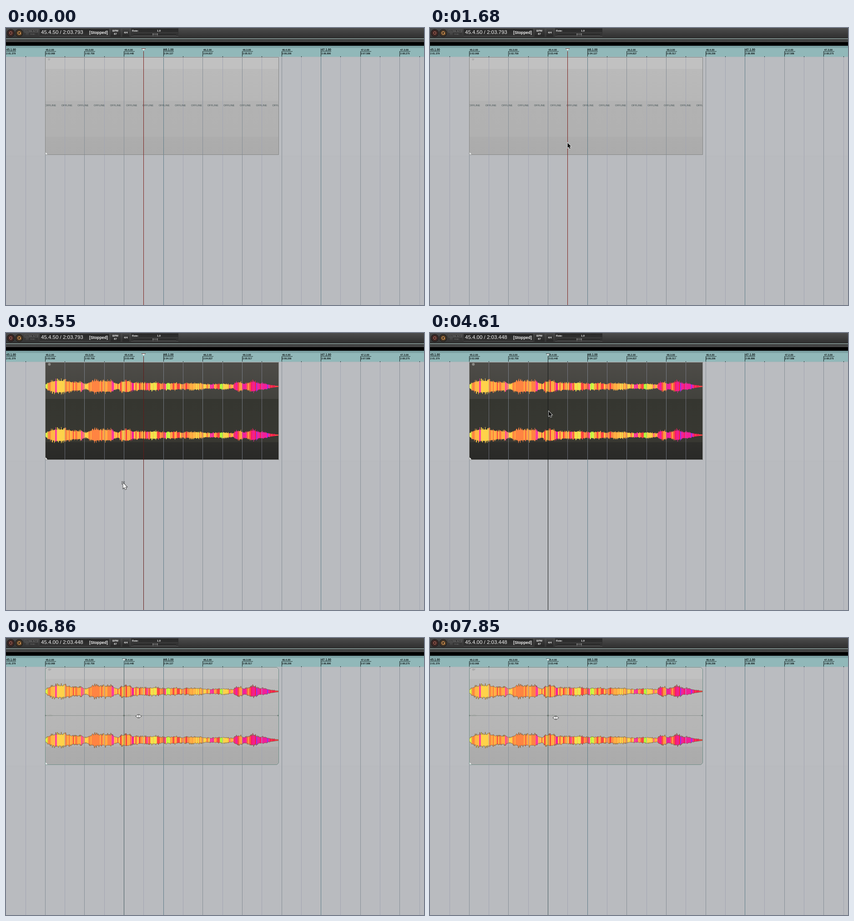
Write an HTML page with a canvas that moves like this. It is 919 px wide and 609 px high and loops after 8 s.

```html
<!DOCTYPE html>
<html lang="en">
<head>
<meta charset="utf-8">
<title>Timeline</title>
<style>
html, body { margin: 0; width: 100%; height: 100%; overflow: hidden; background: #b9bbbf; }
canvas { display: block; width: 919px; height: 609px; }
</style>
</head>
<body>
<canvas id="stage" width="919" height="609"></canvas>
<script>
const ctx = document.getElementById('stage').getContext('2d');
const LOOP = 8000, W = 919, H = 609;
const BEAT = 86.62, ORIGIN = -0.3;
const ITEM = { x: 86, y: 64, w: 514, h: 215 };
const SANS = '"Liberation Sans", Arial, sans-serif';

const beatX = i => ORIGIN + BEAT * i;
const gridX = i => Math.floor(beatX(i));

function rect(x, y, w, h, fill) {
  ctx.fillStyle = fill;
  ctx.fillRect(x, y, w, h);
}

function shade(x, y, w, h, ...colors) {
  const g = ctx.createLinearGradient(0, y, 0, y + h);
  colors.forEach((c, i) => g.addColorStop(i / (colors.length - 1), c));
  rect(x, y, w, h, g);
}

function text(s, x, y, size, fill, weight = '', align = 'left') {
  ctx.font = `${weight} ${size}px ${SANS}`;
  ctx.textAlign = align;
  ctx.fillStyle = fill;
  ctx.fillText(s, x, y);
}

function poly(points, fill, stroke, width = 1) {
  ctx.beginPath();
  points.forEach(([x, y]) => ctx.lineTo(x, y));
  ctx.closePath();
  if (stroke) {
    ctx.strokeStyle = stroke;
    ctx.lineWidth = width;
    ctx.stroke();
  }
  if (fill) {
    ctx.fillStyle = fill;
    ctx.fill();
  }
}

function disc(x, y, r, fill, stroke, width = 1) {
  ctx.beginPath();
  ctx.arc(x, y, r, 0, 7);
  if (fill) { ctx.fillStyle = fill; ctx.fill(); }
  if (stroke) { ctx.strokeStyle = stroke; ctx.lineWidth = width; ctx.stroke(); }
}

function randomizer(seed) {
  return () => {
    seed = (seed * 1664525 + 1013904223) >>> 0;
    return seed / 4294967296;
  };
}

// Waveform: loudness curve, plus colour bands by pitch
const LOUDNESS = [
  [86, 4], [91, 10], [98, 14], [108, 17], [120, 18], [134, 16], [148, 12], [165, 12],
  [175, 7], [185, 13], [196, 17], [212, 15], [230, 16], [240, 9], [247, 8], [254, 14],
  [268, 17], [278, 11], [300, 10], [328, 11], [345, 8], [370, 10], [386, 7], [405, 9],
  [420, 9], [440, 6], [455, 6], [478, 8], [498, 5], [505, 11], [514, 13], [522, 8],
  [532, 10], [542, 15], [556, 9], [566, 9], [577, 5], [588, 3], [600, 1]
];
const TONES = {
  y: '#ffd24a', o: '#ffad42', d: '#ff8442', r: '#fb4444', p: '#ff4b9b',
  m: '#f21f9a', g: '#b4f83a', l: '#e6ef4d', v: '#8a35f5', c: '#f8204f'
};
const BANDS = [
  [91, 'lg'], [108, 'oyd'], [112, 'rp'], [130, 'yyo'], [147, 'yod'], [154, 'rpo'],
  [172, 'odyp'], [180, 'ply'], [206, 'odd'], [214, 'rdo'], [232, 'ddo'], [238, 'mp'],
  [260, 'oydr'], [275, 'dror'], [281, 'mpo'], [306, 'oydr'], [317, 'drp'], [332, 'yly'],
  [346, 'dro'], [352, 'mpr'], [361, 'gl'], [376, 'dor'], [400, 'oyrd'], [420, 'oyyd'],
  [448, 'yold'], [457, 'cmp'], [470, 'odr'], [486, 'lyg'], [500, 'oyp'], [509, 'pmr'],
  [519, 'dor'], [529, 'mp'], [537, 'ord'], [550, 'ccm'], [558, 'vvm'], [571, 'mmc'],
  [580, 'mvr'], [600, 'cr']
];

function loudness(x) {
  const i = Math.max(1, LOUDNESS.findIndex(p => p[0] >= x));
  const [x0, a0] = LOUDNESS[i - 1], [x1, a1] = LOUDNESS[i];
  return a0 + (a1 - a0) * (x - x0) / (x1 - x0);
}

const wave = (() => {
  const rnd = randomizer(87), cols = [];
  let tone = TONES.l, left = 0, band = null;
  for (let x = 86; x < 600; x++) {
    const next = BANDS.find(b => x < b[0]);
    if (next !== band || left-- <= 0) {
      band = next;
      tone = TONES[band[1][Math.floor(rnd() * band[1].length)]];
      left = Math.floor(rnd() * 3);
    }
    // A steady body with sparse sharp peaks
    const a = loudness(x);
    const spike = () => a * (0.68 + 0.36 * Math.pow(rnd(), 3));
    cols.push({ x, tone, up: spike(), down: spike() * 1.04 });
  }
  return cols;
})();

function drawWave(cy, outlined) {
  for (const c of wave) rect(c.x, cy - c.up, 1, c.up + c.down, c.tone);
  if (!outlined) return;
  ctx.strokeStyle = 'rgba(92,66,32,.8)';
  ctx.lineWidth = 0.8;
  for (const side of ['up', 'down']) {
    ctx.beginPath();
    for (const c of wave) ctx.lineTo(c.x + 0.5, cy + (side === 'up' ? -c.up : c.down));
    ctx.stroke();
  }
}

function drawToolbar(position) {
  shade(0, 0, W, 23, '#4c4c4c', '#3d3d3d', '#2e2e2e');
  rect(0, 22, W, 1, '#2c2e2e');
  rect(0, 23, W, 1, '#b5d0cb');
  shade(0, 24, W, 7, '#3c3e3e', '#484848');
  rect(0, 31, W, 8, '#000');

  disc(10.5, 11, 8, '#211c1b', '#171717');
  disc(10.5, 11, 6.5, '#342220', '#5a3832');
  disc(10.5, 11, 2.8, null, '#b36a5c', 1.2);
  disc(29, 11, 8, '#2a2522', '#171717');
  disc(29, 11, 6.5, '#3b2f24', '#59472f');
  disc(29, 11, 3, null, '#d0924e', 1.5);
  rect(30, 12, 3, 2, '#d0924e');

  rect(41, 3, 29, 15, '#353535');
  ctx.strokeStyle = '#5b5b5b';
  ctx.lineWidth = 1;
  ctx.strokeRect(41.5, 3.5, 28, 6);
  text('GLOBAL AUTO', 43, 8.4, 3.8, '#929292');
  rect(43, 11, 7, 1, '#666');
  rect(43, 14, 7, 1, '#555');
  text('READ', 53, 14.8, 4, '#6f6f6f');

  shade(74, 2, 153, 16, '#272727', '#333');
  rect(74, 18, 153, 1, '#484848');
  text(position, 77, 13, 11.5, '#f2f2f2');
  text('[Stopped]', 183, 13.2, 8.8, '#efefef', 'bold');

  shade(230, 1, 22, 18, '#414141', '#262626');
  text('BPM', 240.5, 7.6, 5.8, '#eee', 'bold', 'center');
  text('87', 240.5, 15.4, 5.8, '#eee', 'bold', 'center');
  shade(256, 2, 15, 17, '#414141', '#262626');
  text('4/4', 263.3, 12.4, 6, '#eee', 'bold', 'center');

  shade(275, 1, 104, 18, '#292929', '#363636');
  rect(275, 18, 104, 1, '#4e4e4e');
  rect(276, 10, 102, 1, '#464646');
  text('Rate:', 277, 7.6, 5.8, '#eee', 'bold');
  text('1.0', 336, 7.6, 5.8, '#eee', 'bold', 'center');
  rect(280, 14, 94, 1, '#0c0c0c');
  rect(280, 15, 94, 1, '#555');
  shade(322, 12, 12, 6, '#858585', '#444');
  for (const x of [325, 327.5, 330]) rect(x, 12, 1, 6, '#252525');
}

function drawRuler() {
  shade(0, 39, W, 6, '#769a9c', '#83a9aa');
  rect(0, 44, W, 19, '#91b8b9');
  rect(0, 63, W, 1, '#a8b5b9');
  for (let i = 0; i <= 10; i++) {
    const x = gridX(i), tx = beatX(i) + 0.9, bar = i % 4 === 0;
    const seconds = Math.floor((176 + i) * 60000 / 87) / 1000 - 120;
    rect(x, bar ? 45 : 51, 1, bar ? 18 : 12, '#1c2727');
    rect(x, 51, bar ? 23 : 24, 1, '#2c3c3c');
    text(`${45 + (i >> 2)}.${i % 4 + 1}.00`, tx, 50.4, bar ? 6.4 : 5.5, '#101818', 'bold');
    text(`2:0${seconds.toFixed(3)}`, tx, 57.9, 5.2, '#101818', 'bold');
    rect(gridX(i + 0.5), 62, 1, 2, '#1c2727');
  }
}

function drawGrid(x0, x1, y0, y1, dark) {
  for (let h = 1; h <= 21; h++) {
    const x = gridX(h / 2);
    if (x <= x0 || x >= x1) continue;
    const color = dark ? (h % 2 ? 'rgba(142,146,165,.62)' : 'rgba(143,153,167,.68)')
      : h % 8 === 0 ? '#5f7d89' : h % 2 === 0 ? '#878f97' : '#a2a5b2';
    rect(x, y0, 1, y1 - y0, color);
  }
}

function itemPath(cut, inset = 0) {
  const x = ITEM.x + inset, y = ITEM.y + inset;
  const r = ITEM.x + ITEM.w - inset, b = ITEM.y + ITEM.h - inset;
  ctx.beginPath();
  [[x + cut, y], [r - cut, y], [r, y + cut], [r, b - cut], [r - cut, b], [x, b], [x, y + cut]]
    .forEach(p => ctx.lineTo(...p));
  ctx.closePath();
}

function drawItem(mode, t) {
  const dark = mode === 'selected', split = mode === 'marked';
  const { x, y, w, h } = ITEM;
  ctx.save();
  itemPath(split ? 4 : 0);
  ctx.clip();
  if (dark) {
    shade(x, y, w, 81, '#4e4c48', '#42423d');
    shade(x, 145, w, 95, '#353630', '#383832');
    shade(x, 240, w, 39, '#2e2e2b', '#292927');
  } else {
    rect(x, y, w, 26, '#c1c1c1');
    shade(x, 90, w, 70, '#bababa', '#b7b7b7');
    shade(x, 160, w, 79, split ? '#b7b7b7' : '#b2b2b2', split ? '#b4b4b4' : '#b1b1b1');
    shade(x, 239, w, 40, '#adadad', '#ababab');
  }
  if (mode !== 'offline') {
    drawWave(117.5, split);
    drawWave(224.5, split);
  }
  drawGrid(x, x + w, y, y + h, dark);
  if (mode === 'offline') {
    for (let i = 0; i < 15; i++) text('OFFLINE', x + i * 35.67, 172.2, 5.7, '#405052');
  }
  if (dark) disc(95.3, 68.8, 3, '#8b8a86');
  else text(split ? '@/' : '0/', 92.5, 71, 5.5, '#858585');
  poly([[x, 272], [x + 6, 279], [x, 279]], '#f2f5f5');
  ctx.restore();

  const hover = split && t >= 6500;
  itemPath(split ? 4 : 0, 0.5);
  ctx.strokeStyle = dark ? '#898a88' : hover ? '#6f8d87' : '#858786';
  ctx.lineWidth = 1;
  ctx.stroke();
  if (split) {
    if (hover) {
      rect(x, 170, w - 1, 1, '#8b918f');
      for (const px of [87, 598]) disc(px, 170.5, 1.4, '#718079');
      text('1.00x', 91, 171.8, 4.5, '#989f99');
    }
    text('1.00x', 264, 171.8, 4.5, '#929a93');
  }
}

function drawPlayhead(x, color) {
  rect(x, 51, 1, H - 51, color);
  rect(x - 4, 45, 9, 1, color);
  poly([[x - 3, 46], [x + 4, 46], [x + 0.5, 49.5]], '#f3f7f7', '#607777', 0.6);
}

// Pointer
const MOVES = [
  { from: 620, to: 970, n: 5, path: [[360, 532], [352, 460], [337, 397]], enter: true },
  { from: 1150, to: 1680, n: 7, path: [[337, 397], [316, 335], [302.5, 252.5]] },
  { from: 2570, to: 3370, n: 10,
    path: [[302.5, 252.5], [253, 168], [190, 170], [183, 255], [185, 340], [210, 395]] },
  { from: 3460, to: 3550, n: 2, path: [[210, 395], [257, 329]] },
  { from: 3820, to: 4610, n: 10, path: [[257, 329], [260, 245], [261, 172]] },
  { from: 5690, to: 5690, n: 1, path: [[261, 172], [258, 167]] },
  { from: 6050, to: 6140, n: 2, path: [[260, 172], [260, 174]] },
  { from: 6500, to: 7040, n: 7, path: [[260, 174], [291.5, 172], [298, 172]], ease: 0.7 },
  { from: 7400, to: 7850, n: 6, path: [[298, 172], [276.5, 175.5]] }
];

function along(path, u) {
  const s = u * (path.length - 1), i = Math.min(Math.floor(s), path.length - 2), f = s - i;
  return path[i].map((v, k) => v + (path[i + 1][k] - v) * f);
}

function pointerAt(t) {
  const move = MOVES.filter(m => t >= m.from).pop();
  if (!move) return null;
  const { from, to, n, path, enter, ease } = move;
  const gap = n > 1 ? (to - from) / (n - 1) : 1;
  const step = Math.min(n, Math.floor((t - from) / gap + 0.001) + 1);
  let u = enter ? (step - 1) / (n - 1) : step / n;
  // The long sweep reaches its middle point late
  if (ease) u = u <= 5 / 7 ? u * ease : 0.5 + (u - 5 / 7) * 1.75;
  return along(path, u);
}

function drawArrow(x, y, k, fill, edge) {
  const shape = [[0, 0], [0, 11], [2.5, 8.7], [4.4, 13], [6.2, 12.2], [4.4, 8], [7.6, 8]];
  poly(shape.map(([a, b]) => [x + a * k, y + b * k]), fill, edge, 1.6);
}

function drawSplitter(x, y) {
  for (const s of [-1, 1]) {
    poly([[x + s * 6, y], [x + s * 1.2, y - 3.4], [x + s * 1.2, y + 3.4]], '#f4f4f4', '#222', 1.3);
  }
  rect(x - 1.2, y - 1.5, 2.4, 3, '#f4f4f4');
}

function drawPointer(t) {
  const p = pointerAt(t);
  if (!p) return;
  const [x, y] = p;
  if (t >= 6050) {
    drawSplitter(x, y);
  } else if (y > 281 && t >= 2570) {
    ctx.save();
    ctx.setLineDash([1, 1]);
    ctx.strokeStyle = '#222';
    ctx.lineWidth = 1;
    ctx.strokeRect(Math.round(x) - 2.5, Math.round(y) - 2.5, 6, 6);
    ctx.restore();
    drawArrow(x + 0.5, y + 0.5, 1.12, '#fff', '#222');
  } else {
    drawArrow(x, y, 1, '#080808', '#e8e8e8');
  }
}

function draw(t) {
  const mode = t < 1940 ? 'offline' : t < 5510 ? 'selected' : 'marked';
  const moved = t >= 3820;
  ctx.textBaseline = 'alphabetic';
  rect(0, 0, W, H, '#b9bbbf');
  rect(0, 64, W, 217, '#babcc0');
  rect(0, 281, W, 1, '#b7b9bd');
  drawToolbar(moved ? '45.4.00 / 2:03.448' : '45.4.50 / 2:03.793');
  drawRuler();
  drawGrid(-1, W, 64, H, false);
  drawItem(mode, t);
  if (moved) drawPlayhead(gridX(3), t >= 6500 ? '#455c62' : '#151818');
  else drawPlayhead(gridX(3.5), mode === 'selected' ? '#641a18' : '#7c211d');
  if (mode === 'marked') {
    poly([[259.5, 168], [262, 170.5], [259.5, 173], [257, 170.5]], '#68736d');
  }
  drawPointer(t);
}

const start = performance.now();
function tick() {
  draw((performance.now() - start) % LOOP);
  requestAnimationFrame(tick);
}
tick();
</script>
</body>
</html>
```
